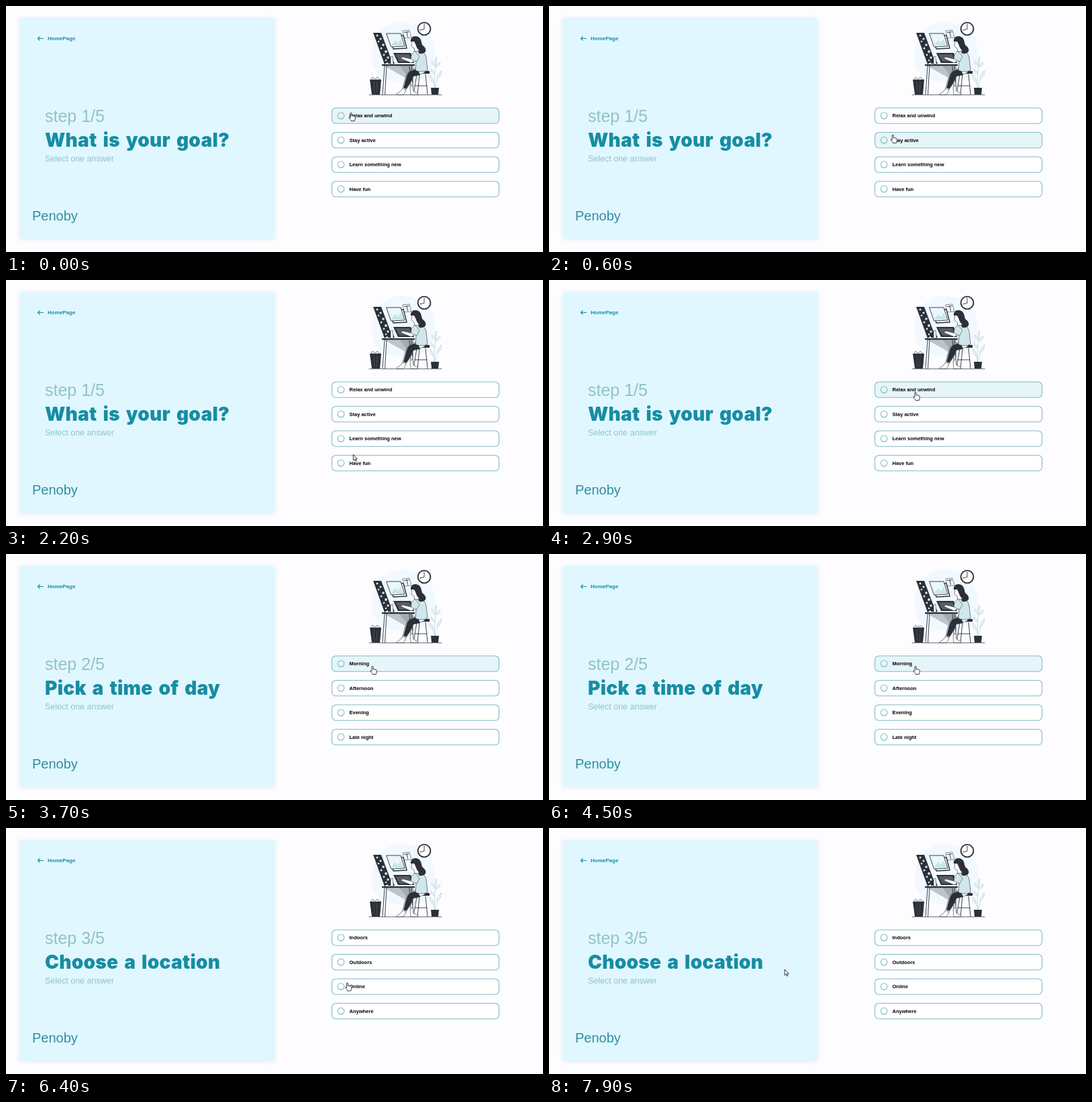
These frames come from a looping animation (800x367 px, 8 s). An HTML page:

```html
<!DOCTYPE html>
<html lang="en">
<head>
<meta charset="utf-8">
<title>Goal quiz</title>
<style>
  html, body { margin: 0; width: 100%; height: 100%; overflow: hidden; background: #fdfcff; }
  svg { display: block; width: 100vw; height: 100vh; }
  text { font-family: "Liberation Sans", Arial, sans-serif; }
  .card { fill: #e1f7ff; filter: drop-shadow(0 1px 3px #b9c9d455); }
  .soft { fill: #8fc3c9; }
  .teal { fill: #178da3; }
  .title { font: 900 28px Inter, sans-serif; letter-spacing: .3px; word-spacing: 3px; }
  .option rect, .option circle { stroke: #83bcc2; stroke-width: 1.1; fill: #fff; }
  .option circle { fill: none; }
  .option text { font-size: 7.5px; font-weight: bold; }
  .option.on rect { fill: #e6f5f9; }
  .dark { fill: #2b3038; }
  .ink { fill: none; stroke: #2b3038; stroke-width: .9; stroke-linecap: round; stroke-linejoin: round; }
  .pale { fill: #cfe6ec; }
  .skin { fill: #fff; stroke: #2b3038; stroke-width: .6; stroke-linejoin: round; }
  #cursor path { fill: #fff; stroke: #222; stroke-width: .9; stroke-linejoin: round; }
</style>
</head>
<body>
<svg viewBox="0 0 800 367" preserveAspectRatio="none">
  <rect class="card" x="20" y="17.5" width="380.5" height="330" rx="4"/>
  <path d="M56 48.5H47.5M50.5 45.5L47.5 48.5L50.5 51.5" fill="none" stroke="#178da3" stroke-width="1.2"/>
  <text class="teal" x="62" y="51" font-size="8" font-weight="bold">HomePage</text>
  <text class="soft" id="step" x="58" y="172.5" font-size="25"></text>
  <text class="teal title" id="title" x="58" y="210"></text>
  <text class="soft" x="58" y="232" font-size="12.5">Select one answer</text>
  <text x="39" y="319.5" font-size="20" fill="#318ea4">Penoby</text>

  <g id="scene">
    <path d="M546 62C550 34 574 20 600 25C632 28 645 60 637 90C630 118 586 120 562 108C546 98 542 82 546 62Z" fill="#f1f9ff"/>
    <!-- clock -->
    <circle cx="623" cy="34" r="9.4" fill="#fff" stroke="#2b3038" stroke-width="1.9"/>
    <path class="ink" d="M623 27V34.5L616.5 36"/>
    <!-- swatch board -->
    <path class="dark" d="M547 40H559L574 80L564 87Z"/>
    <g fill="#dce7ec">
      <circle cx="553" cy="44" r="1.5"/><circle cx="558" cy="49" r="1.6"/><circle cx="555" cy="53" r="1.3"/>
      <circle cx="562" cy="58" r="1.8"/><circle cx="559" cy="63" r="1.5"/><circle cx="566" cy="68" r="1.9"/>
      <circle cx="563" cy="73" r="1.4"/><circle cx="569" cy="77" r="1.7"/><circle cx="566" cy="81" r="1.3"/>
    </g>
    <!-- screens -->
    <path class="ink" fill="#fff" d="M571 44L592 44L597 63L577 64Z" style="fill:#fff;stroke-width:1.4"/>
    <path class="ink" d="M567 41L588 41L594 60L574 61Z" style="fill:#eaf7fc"/>
    <path d="M573 59L580 51L584 55L588 49L592 59Z" fill="#c8e6ef"/>
    <path class="ink" d="M591 37L601 36L604 47L593 48Z" stroke-dasharray="1.5 1" style="stroke-width:.6"/>
    <path class="ink" d="M593.5 39.5L600 38.5M597 39L598.5 46"/>
    <!-- desk -->
    <path d="M563 89H607L606 106L600 110Z" fill="#bfc4c8"/>
    <path d="M586 89H607V116Z" fill="#a5abb0"/>
    <path class="ink" d="M564 89L561 132M567 89L564.5 132M604 90L607 132M601 90L604 132"/>
    <path class="dark" d="M560 87H609V89.3H560Z"/>
    <path class="dark" d="M577 70H603L608 85H584Z"/>
    <path d="M580 72H601L605 83H586Z" fill="#555d67"/>
    <path class="dark" d="M568 81L575 78L579 86H569Z"/>
    <path class="skin" d="M573 76L576 75L577 87H573Z"/>
    <!-- stool -->
    <path class="ink" d="M612 102L607 132M616 102L613 132M625 102L628 132M609 119H627"/>
    <path class="dark" d="M608 97H631V101H608Z"/>
    <!-- person -->
    <path class="skin" d="M624 93C627 99 621 102 612 102L606 105C604 113 600 120 594 127L590 125C594 114 594 103 601 97L611 92Z"/>
    <path class="dark" d="M613 93L602 97C596 101 596 110 592 122L596 124C603 115 605 109 607 105L617 103Z"/>
    <path class="skin" d="M591 123L587 128L582 131V132.5H592L596 126Z"/>
    <path class="skin" d="M606 118L607 127L614 131V132.5H603L602 121Z"/>
    <path class="pale" d="M609 66C616 64 624 68 626 77L628 96C621 99 614 98 610 96L611 82L605 81Z" stroke="#2b3038" stroke-width=".6"/>
    <path class="skin" d="M608 70L603 79L591 76L588 78L592 80L604 85L613 78"/>
    <path class="pale" d="M609 67C603 72 603 76 604 80L612 83L616 75Z" stroke="#2b3038" stroke-width=".5"/>
    <path class="skin" d="M605 51L604 60L608 63L609 68L615 67V51Z"/>
    <path class="dark" d="M603 53C602 47 608 43 614 46C620 49 618 56 621 59C627 63 627 70 620 71C614 72 613 68 616 66C611 64 611 57 608 53Z"/>
    <!-- bin -->
    <path d="M543 110L546 106L550 109L553 106L558 110Z" fill="#e5eaed" stroke="#2b3038" stroke-width=".5"/>
    <path class="dark" d="M542 110H559L557 132H545Z"/>
    <path d="M548 113L549 130M553 113L552 130" stroke="#59616a" stroke-width=".6"/>
    <!-- plant -->
    <path class="ink" d="M639 123C637 109 640 92 641 77M639 123C642 112 643 104 648 97M639 123C637 113 634 107 632 103" style="stroke:#a8c7cd;stroke-width:.6"/>
    <path d="M641 76Q638 80 640 85Q643 80 641 76M640 90Q634 88 634 82Q640 84 640 90M641 91Q647 89 647 84Q641 85 641 91M639 102Q633 100 633 94Q639 97 639 102M642 109Q649 105 649 97Q643 101 642 109M637 114Q630 110 631 103Q637 106 637 114" fill="#e4f3f5" stroke="#a8c7cd" stroke-width=".5"/>
    <path class="dark" d="M633 122H645L644 132H634Z"/>
    <path class="ink" d="M541 132.6H649" style="stroke-width:.7"/>
  </g>

  <g id="options"></g>
  <g id="cursor">
    <path id="hand" d="M-1 .8C-1-.5 1-.5 1 .8V4.6C1.3 3.8 2.8 3.9 2.9 5C3.4 4.3 4.7 4.5 4.7 5.5C5.3 5 6.2 5.4 6.2 6.3V8.6C6.2 10 5.2 10.6 5.2 12H.2C0 10.5-1.6 9.6-3 7.4C-3.4 6.5-2.2 5.9-1 7.3Z"/>
    <path id="arrow" d="M0 0V8.7L2 6.9L3.4 10L4.8 9.4L3.5 6.4H6.1Z"/>
  </g>
</svg>
<script>
const LOOP = 8000, ROW_TOP = 152, ROW_GAP = 36.5, ROW_HEIGHT = 23.3;
const steps = [
  { at: 0, title: "What is your goal?", answers: ["Relax and unwind", "Stay active", "Learn something new", "Have fun"] },
  { at: 3200, title: "Pick a time of day", answers: ["Morning", "Afternoon", "Evening", "Late night"] },
  { at: 6400, title: "Choose a location", answers: ["Indoors", "Outdoors", "Online", "Anywhere"] }
];
// Pointer stops: time, x, y
const stops = [
  [0, 514, 159.5], [200, 514, 160], [700, 512, 196], [1200, 509.5, 231], [1400, 509.5, 231],
  [1900, 513, 267], [2100, 515, 268], [2700, 546, 167.5], [4600, 546, 167.5],
  [5350, 514, 265], [5550, 512, 264], [5900, 508.5, 231], [6600, 508.5, 231],
  [7500, 351, 211], [LOOP, 351, 211]
];
const $ = id => document.getElementById(id);

$("options").innerHTML = steps[0].answers.map((_, i) => `
  <g class="option" transform="translate(0 ${ROW_TOP + i * ROW_GAP})">
    <rect x="485.5" width="249" height="${ROW_HEIGHT}" rx="6"/>
    <circle cx="499" cy="11.6" r="4.8"/>
    <text x="511.5" y="14.4"></text>
  </g>`).join("");
const rows = [...document.querySelectorAll(".option")];

function pointerAt(t) {
  const next = stops.findIndex(s => s[0] > t);
  const [t0, x0, y0] = stops[next - 1], [t1, x1, y1] = stops[next];
  const u = (t - t0) / (t1 - t0), k = u * u * (3 - 2 * u);
  return [x0 + (x1 - x0) * k, y0 + (y1 - y0) * k];
}

function draw(t) {
  const index = steps.findLastIndex(s => s.at <= t);
  const step = steps[index];
  const [x, y] = pointerAt(t);
  const over = rows.findIndex((_, i) => {
    const top = ROW_TOP + i * ROW_GAP;
    return x > 485 && x < 735 && y >= top && y <= top + ROW_HEIGHT;
  });
  // A fresh page has no highlight until the pointer settles.
  const fresh = index > 0 && t < step.at + 350;

  $("step").textContent = `step ${index + 1}/5`;
  $("title").textContent = step.title;
  rows.forEach((row, i) => {
    row.classList.toggle("on", i === over && !fresh);
    row.querySelector("text").textContent = step.answers[i];
  });
  $("cursor").setAttribute("transform", `translate(${x} ${y})`);
  $("hand").style.display = over < 0 ? "none" : "";
  $("arrow").style.display = over < 0 ? "" : "none";
}

function tick() {
  draw(performance.now() % LOOP);
  requestAnimationFrame(tick);
}
tick();
</script>
</body>
</html>
```
